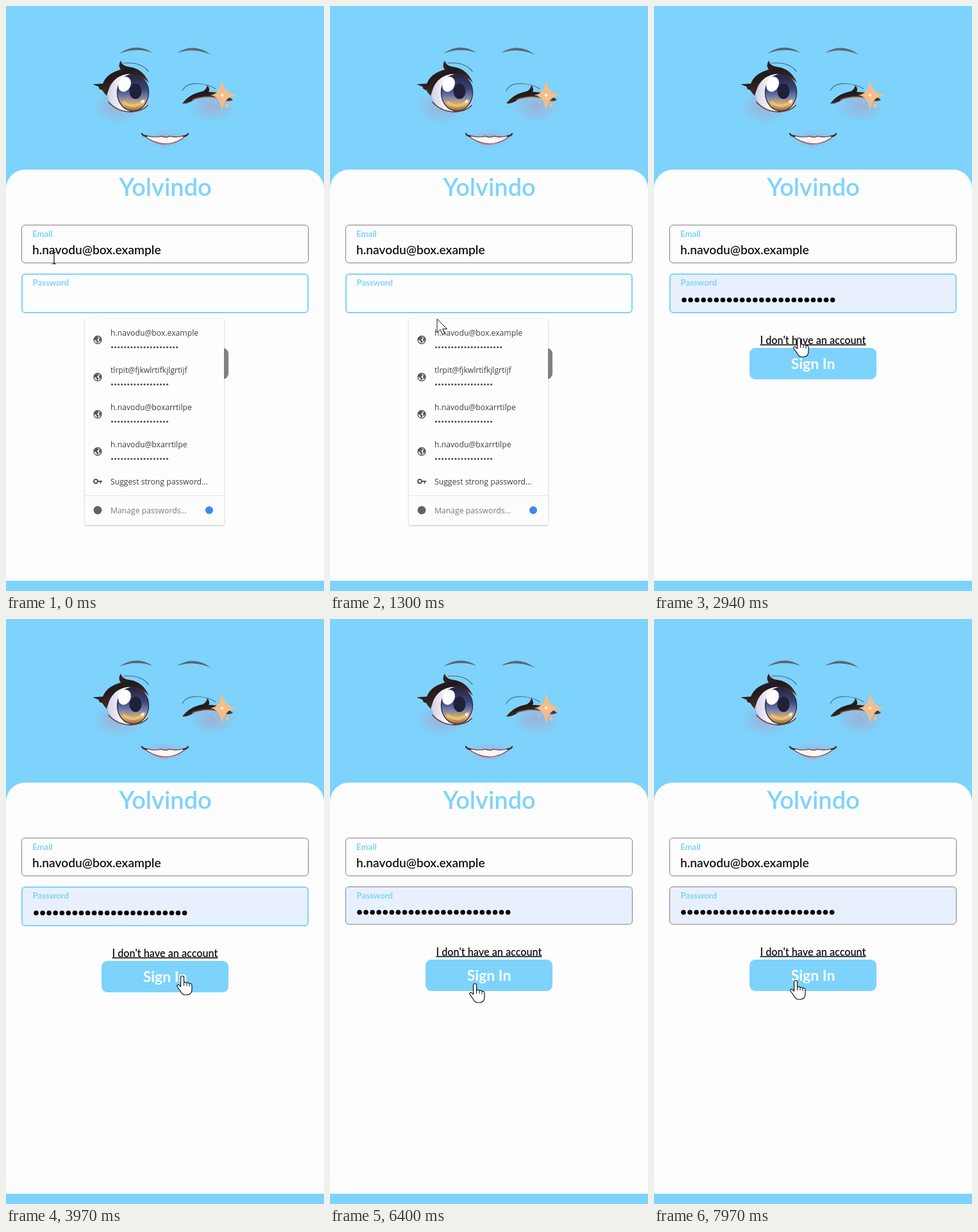
These frames come from a looping animation (496 by 912 pixels, 8 s). An HTML page:

```html
<!DOCTYPE html>
<html lang="en">
<head>
<meta charset="utf-8">
<title>Sign in</title>
<style>
  html, body { margin: 0; width: 100%; height: 100%; overflow: hidden; background: #7dd3fc; }
  svg { display: block; width: 496px; height: 912px; }
  text { font-family: Lato, sans-serif; font-weight: 600; }
  .mid { text-anchor: middle; }
  .label { font-size: 13.2px; font-weight: 700; fill: #7dd3fc; }
  #popup text { font: 400 12.2px "Open Sans", sans-serif; fill: #3c4043; }
  .line { fill: none; stroke-linecap: round; }
</style>
</head>
<body>
<svg viewBox="0 0 496 912">
  <defs>
    <radialGradient id="blush">
      <stop offset="0" stop-color="#a3abd0" stop-opacity=".85"/>
      <stop offset=".5" stop-color="#95b8e0" stop-opacity=".55"/>
      <stop offset="1" stop-color="#7dd3fc" stop-opacity="0"/>
    </radialGradient>
    <linearGradient id="iris" x2="0" y2="1">
      <stop offset="0" stop-color="#25233b"/>
      <stop offset=".4" stop-color="#3c4677"/>
      <stop offset=".62" stop-color="#7480ae"/>
      <stop offset=".82" stop-color="#e3b162"/>
      <stop offset="1" stop-color="#96683f"/>
    </linearGradient>
    <linearGradient id="white" x2="1">
      <stop offset="0" stop-color="#d4d0e2"/>
      <stop offset=".4" stop-color="#fcfbff"/>
      <stop offset="1" stop-color="#d8d4e6"/>
    </linearGradient>
    <linearGradient id="lash" x2=".6" y2="1">
      <stop offset="0" stop-color="#493031"/>
      <stop offset=".5" stop-color="#21191d"/>
      <stop offset="1" stop-color="#5b3528"/>
    </linearGradient>
    <filter id="shade" x="-10%" y="-10%" width="120%" height="120%">
      <feDropShadow dx="0" dy="1" stdDeviation="1.4" flood-color="#707078" flood-opacity=".45"/>
    </filter>
  </defs>

  <rect width="496" height="912" fill="#7dd3fc"/>

  <g id="face">
    <ellipse cx="174" cy="157" rx="49" ry="33" fill="url(#blush)"/>
    <ellipse cx="322" cy="156" rx="45" ry="31" fill="url(#blush)"/>
    <ellipse cx="249" cy="207" rx="38" ry="19" fill="url(#blush)"/>
    <g fill="#5b6674">
      <path d="M177 74Q203 56 229 73Q203 64 177 74Z"/>
      <path d="M267 73Q293 56 320 76Q293 64 267 73Z"/>
    </g>

    <path d="M158 135Q163 109 190 104Q216 104 222 126Q227 151 212 161Q192 170 170 158Q159 150 158 135Z" fill="url(#white)"/>
    <ellipse cx="198" cy="135" rx="24.5" ry="28.5" fill="url(#iris)" stroke="#33314f" stroke-width="1.5"/>
    <ellipse cx="202" cy="133" rx="9.5" ry="12" fill="#1f2039"/>
    <path class="line" d="M184 150Q200 163 215 147" stroke="#f3cf85" stroke-width="4" opacity=".65"/>
    <ellipse cx="185" cy="122" rx="9.5" ry="12" fill="#fff" transform="rotate(24 185 122)"/>
    <circle cx="213" cy="149" r="2.5" fill="#fff3dc"/>
    <path d="M135 122L151 121Q157 105 179 99Q174 93 179 85Q181 94 193 95Q214 98 223 120Q209 105 190 106Q169 109 161 128L157 140Q153 136 150 131Q143 129 145 126Z" fill="url(#lash)"/>
    <path class="line" d="M160 150Q174 165 195 165Q213 164 221 155" stroke="#654235" stroke-width="1.8"/>
    <path class="line" d="M184 89Q211 87 222 102" stroke="#4b5f70" stroke-width="1.2"/>

    <path d="M275 152Q286 137 307 133Q313 130 314 123Q319 130 316 134Q337 133 354 146Q350 149 345 148Q317 136 295 145Q284 153 275 152Z" fill="url(#lash)"/>
    <path class="line" d="M275 132Q281 120 300 121Q316 122 327 129" stroke="#4c7082" stroke-width="1.2"/>
    <path class="line" d="M291 146Q318 136 344 148" stroke="#9c5c3c" stroke-width="1.5"/>
    <g fill="#f6bd88">
      <path d="M337 112Q338 135 361 139Q339 141 337 166Q335 141 318 139Q336 135 337 112Z" opacity=".35"/>
      <path d="M337 112Q337.500 137 360 139Q338.500 141 337 166Q335.500 141 319 139Q336.500 137 337 112Z"/>
      <path d="M345 150Q346 155 350 155Q346 156 345 160Q344 156 340 155Q344 155 345 150Z"/>
      <circle cx="327" cy="151" r="1.2"/>
      <circle cx="337" cy="139" r="2.2" fill="#fff3e0"/>
    </g>

    <path d="M214 201Q231 206 243 203Q249 206 255 203Q267 206 282 201Q267 215 248 215Q229 214 214 201Z" fill="#fff8f6" stroke="#80505a" stroke-width="1.5"/>
    <path class="line" d="M212 199Q214 203 219 203M284 199Q282 203 277 203" stroke="#453136" stroke-width="2.5"/>
    <path class="line" d="M235 214Q248 218 261 213" stroke="#bd8199" stroke-width="1.6"/>
  </g>

  <path d="M0 285A30 30 0 0 1 30 255H466A30 30 0 0 1 496 285V896H0Z" fill="#fdfdfe"/>
  <text class="mid" x="248.5" y="296" font-size="38" font-weight="700" fill="#7dd3fc">Yolvindo</text>

  <rect x="24.5" y="341.5" width="447" height="59" rx="5" fill="none" stroke="#808084"/>
  <text class="label" x="41" y="360">Email</text>
  <text x="41" y="387" font-size="19.2" fill="#111">h.navodu@box.example</text>

  <rect id="pass" rx="5"/>
  <text class="label" x="41.5" y="436">Password</text>
  <g id="dots" fill="#080808"></g>
  <path id="caret" d="M283.5 445V470" stroke="#111"/>

  <g id="actions">
    <text class="mid" x="248" y="526.5" font-size="16.2" fill="#111" text-decoration="underline">I don't have an account</text>
    <rect id="button" x="149" y="533" width="198" height="49" rx="9"/>
    <text class="mid" x="248" y="566" font-size="23" style="font-weight:700" fill="#fff">Sign In</text>
  </g>

  <g id="popup">
    <path d="M125 488H136L146 482L156 488H338Q340 488 340 490V806Q340 809 337 809H126Q123 809 123 806V490Q123 488 125 488Z" fill="#fdfdfe" filter="url(#shade)"/>
    <g id="rows"></g>
    <g fill="none" stroke="#54575b" stroke-width="2">
      <circle cx="140" cy="741" r="3"/>
      <path d="M143 741H150M147.500 741V744.500"/>
    </g>
    <text x="163" y="746">Suggest strong password...</text>
    <path d="M123 763.500H340" stroke="#e6e6ea"/>
    <circle cx="143" cy="786" r="6.500" fill="#5f6368"/>
    <text x="163" y="791" style="fill:#777a7f">Manage passwords...</text>
    <circle cx="317" cy="786" r="6" fill="#4285f4"/>
  </g>

  <g id="beam"><path d="M-3 -8H-1L0 -7L1 -8H3M0 -7V9M-3 10H-1L0 9L1 10H3" fill="none" stroke="#111" stroke-width="1.2"/></g>
  <g id="arrow"><path d="M0 0V21L5 16.500L8.500 24L12 22.500L8.500 15.500H15.500Z" fill="#fff" stroke="#111"/></g>
  <g id="hand">
    <path d="M-2.500 1Q-2.500 -1.500 0 -1.500Q2.500 -1.500 2.500 1V9Q5 7 7 9.500Q10 8 11 10.500Q15 9.500 15 14V19Q15 28 7 28H4Q0 28 -3 22L-8 15Q-9 12 -6 12L-2.500 15Z" fill="#fff" stroke="#111" stroke-width="1.200"/>
    <path d="M2.500 9V14M7 10V14M11 11V15" stroke="#111"/>
  </g>
</svg>
<script>
const LOOP = 8000, PICK = 2140, PRESS = 4600, BLINK = 550;
const $ = id => document.getElementById(id);
const set = (el, attrs) => { for (const k in attrs) el.setAttribute(k, attrs[k]); };
const show = (id, on) => { $(id).style.display = on ? '' : 'none'; };
const dotRow = (n, x, y, step, r) => Array.from({ length: n }, (_, i) =>
  `<circle cx="${x + i * step}" cy="${y}" r="${r}"/>`).join('');

$('dots').innerHTML = dotRow(24, 47, 458.3, 10.07, 3.8);

const saved = [
  ['h.navodu@box.example', 21],
  ['tlrpit@fjkwlrtifkjlgrtijf', 18],
  ['h.navodu@boxarrtilpe', 18],
  ['h.navodu@bxarrtilpe', 18]
];
$('rows').innerHTML = saved.map(([name, n], i) => `
  <g transform="translate(0 ${i * 58})">
    <circle cx="143" cy="520.5" r="6" fill="#fdfdfe" stroke="#54575b" stroke-width="1.4"/>
    <path d="M138 517L142 515L145 517L142 520L145 523L142 526L141 522L137 520ZM146 516L149 520L146 524L145 520Z" fill="#54575b"/>
    <text x="163" y="514">${name}</text>
    <g fill="#4a4d51">${dotRow(n, 165.5, 532, 5.06, 1.6)}</g>
  </g>`).join('');

// time, x, y of the pointer tip
const path = [
  [0, 75, 392], [40, 75, 392], [400, 104, 424], [540, 104, 424], [1000, 149, 470],
  [1140, 149, 470], [1300, 167, 488], [1400, 174, 493], [1670, 174, 493],
  [2050, 214, 505], [2200, 214, 505], [2440, 226, 519], [2940, 226, 519],
  [3500, 270, 553], [3840, 273, 557], [3970, 275, 558], [4800, 275, 558],
  [4900, 270, 562], [5040, 270, 562], [5470, 243, 575], [5800, 232, 574],
  [5900, 231, 573], [6400, 226, 570], [6740, 226, 570], [7200, 223, 567],
  [7540, 223, 567], [7970, 221, 565], [LOOP, 221, 565]
];

function pointer(t) {
  const i = path.findIndex(p => p[0] > t);
  const [t0, x0, y0] = path[i - 1], [t1, x1, y1] = path[i];
  const k = (t - t0) / (t1 - t0);
  return [x0 + (x1 - x0) * k, y0 + (y1 - y0) * k];
}

function shape(x, y, open) {
  const inside = (l, t, r, b) => x >= l && x <= r && y >= t && y <= b;
  if (inside(24, 341, 472, 401) || inside(24, 417, 472, 478)) return 'beam';
  const clickable = inside(166, 511, 330, 530) || inside(149, 531, 347, 582);
  return !open && clickable ? 'hand' : 'arrow';
}

function draw() {
  const t = performance.now() % LOOP;
  const open = t < PICK, focus = t < PRESS;

  show('popup', open);
  show('dots', !open);
  show('caret', !open && focus && Math.floor((t - PICK) / BLINK) % 2 === 0);
  set($('button'), { fill: open ? '#808080' : '#7dd3fc' });
  set($('pass'), {
    x: focus ? 25 : 24.5, y: focus ? 418 : 417.5,
    width: focus ? 446 : 447, height: focus ? 60 : 58.5,
    fill: open ? 'none' : '#e8f0fe',
    stroke: focus ? '#7dd3fc' : '#808084', 'stroke-width': focus ? 2 : 1
  });
  set($('dots'), { transform: focus ? '' : 'translate(-1 -1)' });
  set($('actions'), { transform: focus ? '' : 'translate(0 -2)' });

  const [x, y] = pointer(t), kind = shape(x, y, open);
  for (const id of ['beam', 'arrow', 'hand']) show(id, id === kind);
  set($(kind), { transform: `translate(${Math.round(x)} ${Math.round(y)})` });
  requestAnimationFrame(draw);
}
draw();
</script>
</body>
</html>
```
